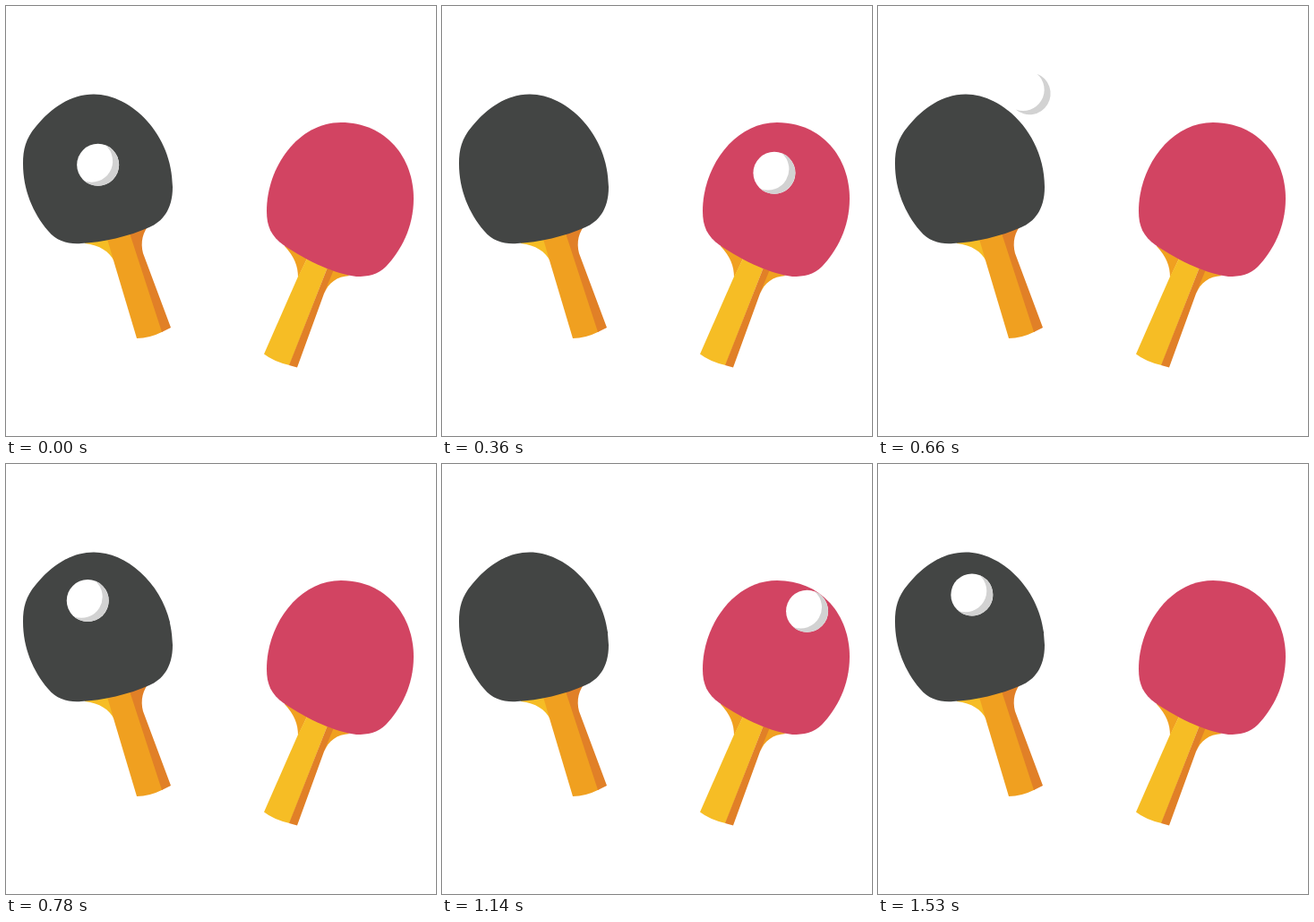
These frames come from a looping animation (480 by 480 pixels, 1560 ms). An HTML page:

```html
<!DOCTYPE html>
<html lang="en">
<head>
<meta charset="utf-8">
<title>Table tennis</title>
<style>
html, body { margin: 0; height: 100%; overflow: hidden; background: #fff; }
svg { display: block; width: 100%; height: 100%; }
.yellow { fill: #f6bd25; }
.orange { fill: #f0a020; }
.dark { fill: #e18027; }
</style>
</head>
<body>
<svg viewBox="0 0 480 480">
  <g id="black-bat">
    <path class="yellow" d="M88 264L113 256L121 285C115 274 105 267 88 265Z"/>
    <path class="orange" d="M111 253L138 249L175 363.500Q160 371 146 371L120 284Z"/>
    <path class="dark" d="M136.500 249L162 242C152 252 150 264 153 276L184 359L174 364Z"/>
    <path fill="#434544" d="M98 98.500C140 98.500 186 144 186 202C186 228 174 241 160 247C138 257 107 264 84 265C70 266 57 263 47 251C30 231 19 205 19 176C19 160 22 148 33 135C50 114 72 98.500 98 98.500Z"/>
  </g>
  <g id="red-bat">
    <path class="orange" d="M311 266L337 280L326 303C326 290 322 280 311 268Z"/>
    <path class="yellow" d="M337 280L360 289L316.500 401Q299 397 288 388.500L326 302Z"/>
    <path class="dark" d="M360 289L368 294L355 321L325 403.500L316 401Z"/>
    <path class="orange" d="M366 294L384 301C369 302 360 309 355 321Z"/>
    <path fill="#d24462" d="M374 130C424 130 455 169 455 215C455 247 441 273 424 291C415 300 404 302 391 302C368 299 338 286 310 267C296 257 291 246 291 229C291 180 326 130 374 130Z"/>
  </g>
  <g id="ball">
    <circle r="23.5" fill="#fff"/>
    <path fill="#d2d2d2" d="M8.300-22A23.500 23.500 0 1 1-15.500 17.700A23.500 23.500 0 0 0 8.300-22Z"/>
  </g>
</svg>
<script>
const LOOP = 1560;
const ball = document.getElementById('ball');

// Each shot leaves one bat at its start time and drops steeply onto the other.
const shots = [
  [0, 'M102 178C215 65 320 40 381 212'],
  [390, 'M381 212C264 116 82 20 89 191'],
  [824, 'M89 191C190 85 395 34 416 200'],
  [1172, 'M416 200C248 29 105 20 102 178'],
].map(([start, d]) => {
  const path = document.createElementNS('http://www.w3.org/2000/svg', 'path');
  path.setAttribute('d', d);
  return { start, path, length: path.getTotalLength() };
});

function draw(now) {
  const t = now % LOOP;
  const i = shots.findLastIndex(shot => shot.start <= t);
  const { start, path, length } = shots[i];
  const end = i + 1 < shots.length ? shots[i + 1].start : LOOP;
  const { x, y } = path.getPointAtLength(length * (t - start) / (end - start));
  ball.setAttribute('transform', `translate(${x} ${y})`);
}

const origin = performance.now();
function tick() {
  draw(performance.now() - origin);
  requestAnimationFrame(tick);
}
tick();
</script>
</body>
</html>
```
